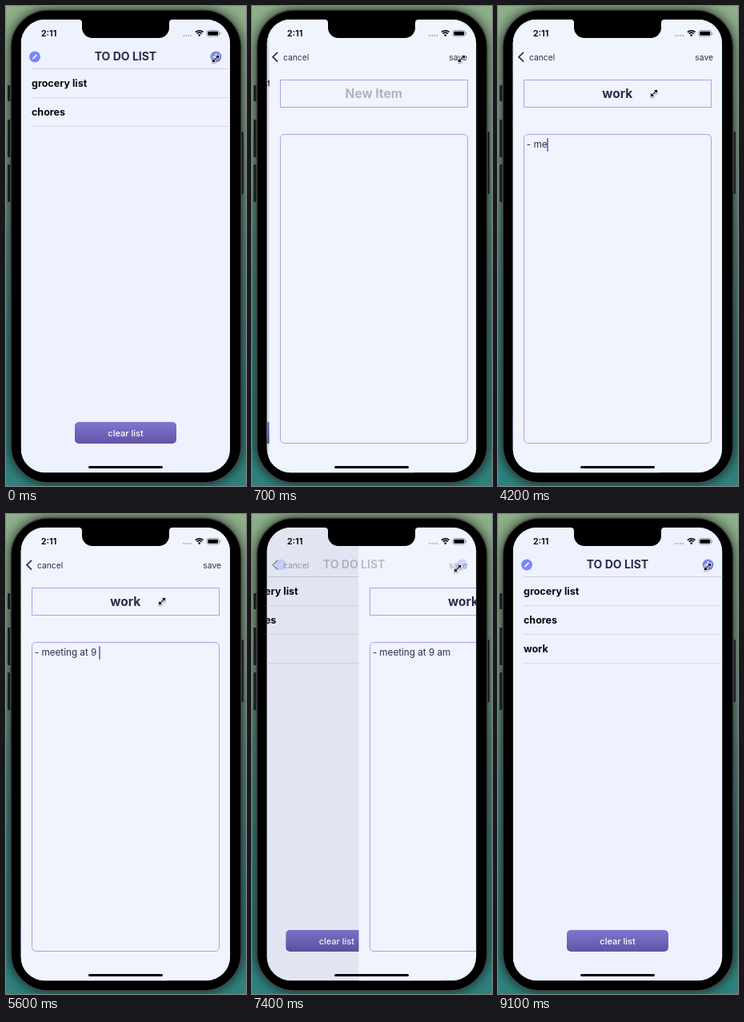
Write an HTML page with a canvas that moves like this. It is 300 px wide and 600 px high and loops after 9200 ms.

```html
<!DOCTYPE html>
<html lang="en">
<head>
<meta charset="utf-8">
<title>To do list</title>
<style>
  html, body { margin: 0; width: 100%; height: 100%; overflow: hidden; }
  canvas { display: block; width: 300px; height: 600px; }
</style>
</head>
<body>
<canvas id="stage"></canvas>
<script>
const LOOP = 9200, STEP = 100;
const PUSH = 340, POP = 7317, TAP_TITLE = 1500, TAP_NOTE = 3400, BLUR = 6700;
const INK = '#2c2c4e', VIOLET = '#a7a1ea', BLUE = '#7b87f6', CARET = '#5852b4';
const SCREEN = { x: 18.6, y: 16.8, w: 261.6, h: 566.6 };
const ROW = 36;

const canvas = document.getElementById('stage');
const ratio = window.devicePixelRatio || 1;
canvas.width = 300 * ratio;
canvas.height = 600 * ratio;
const ctx = canvas.getContext('2d');
ctx.scale(ratio, ratio);

const clamp = v => Math.min(1, Math.max(0, v));

function ease(t, from, to) {
  const u = clamp((t - from) / (to - from));
  return u * u * (3 - 2 * u);
}

// Critically damped spring from 0 to 1.
function spring(ms) {
  const a = 0.018 * Math.max(0, ms);
  return 1 - (1 + a) * Math.exp(-a);
}

function box(x, y, w, h, r, fill, stroke, lineWidth = 1) {
  ctx.beginPath();
  ctx.roundRect(x, y, w, h, r);
  if (fill) { ctx.fillStyle = fill; ctx.fill(); }
  if (stroke) { ctx.strokeStyle = stroke; ctx.lineWidth = lineWidth; ctx.stroke(); }
}

function disc(x, y, r, fill) {
  ctx.beginPath();
  ctx.arc(x, y, r, 0, Math.PI * 2);
  ctx.fillStyle = fill;
  ctx.fill();
}

function line(color, width, ...points) {
  ctx.beginPath();
  points.forEach(([x, y]) => ctx.lineTo(x, y));
  ctx.strokeStyle = color;
  ctx.lineWidth = width;
  ctx.stroke();
}

// Returns the width of the drawn text.
function label(text, x, y, size, weight, color, align = 'left') {
  ctx.font = `${weight} ${size}px Inter, "Open Sans", sans-serif`;
  ctx.textAlign = align;
  ctx.fillStyle = color;
  ctx.fillText(text, x, y);
  return ctx.measureText(text).width;
}

function vertical(y0, y1, ...colors) {
  const gradient = ctx.createLinearGradient(0, y0, 0, y1);
  colors.forEach((c, i) => gradient.addColorStop(i / (colors.length - 1), c));
  return gradient;
}

function layer(alpha, dx, draw) {
  ctx.save();
  ctx.globalAlpha *= alpha;
  ctx.translate(dx, 0);
  draw();
  ctx.restore();
}

// Each burst of typing has a start time and a pause per key.
const burst = (start, pause, text) =>
  [...text].map((key, i) => ({ key, at: start + i * pause }));
const titleKeys = burst(2400, 100, 'work');
const noteKeys = [
  ...burst(3500, 100, '- '), ...burst(4000, 150, 'mee'),
  ...burst(4500, 85, 'ting at 9'), ...burst(5600, 150, ' am')
];
const typed = (keys, t) => keys.filter(k => k.at <= t).map(k => k.key).join('');

// Solid after each key or tap, then blinking.
function caretAlpha(t) {
  if (t < TAP_TITLE || t > BLUR) return 0;
  const resets = [TAP_TITLE, TAP_NOTE, ...[...titleKeys, ...noteKeys].map(k => k.at)];
  const idle = t - Math.max(...resets.filter(at => at <= t));
  return clamp((700 - idle % 1000) / 150);
}

function drawPhone() {
  ctx.fillStyle = vertical(0, 600, '#8fb08b', '#7da183', '#558b80', '#38817d', '#2f827e');
  ctx.fillRect(0, 0, 300, 600);
  ctx.save();
  ctx.shadowColor = 'rgba(0,0,0,.8)';
  ctx.shadowBlur = 16 * ratio;
  box(6, 5, 288, 591, 47, '#000');
  ctx.restore();
  for (const [y, h] of [[99, 20], [142, 47], [198, 47]]) box(2, y, 4, h, 1, '#1d1e20');
  box(293.5, 157, 3.5, 78, 1, '#1d1e20');
  box(6, 5, 288, 591, 47, '#000', '#47494b', 1.4);
}

function drawPage(color) {
  ctx.fillStyle = color;
  ctx.fillRect(SCREEN.x, SCREEN.y, SCREEN.w, SCREEN.h);
}

function drawList(rows) {
  drawPage('#eef2ff');
  line('#cfd1dc', 1, [32, 78.5], [281, 78.5]);
  rows.forEach((text, i) => {
    label(text, 32, 101 + ROW * i, 12.5, 700, '#08080e');
    line('#d9dbe5', 1, [32, 114.5 + ROW * i], [281, 114.5 + ROW * i]);
  });
  box(86, 520, 127, 27, 5, vertical(520, 547, '#8176cf', '#7166bd', '#6052a6'));
  label('clear list', 149.5, 537.5, 11, 500, '#fff', 'center');
}

function drawForm(t) {
  drawPage('#eff4fd');
  box(32.5, 92.5, 234, 34, 0, null, VIOLET);
  box(32.5, 160.5, 234, 386, 5, null, VIOLET);

  const title = typed(titleKeys, t);
  const titleWidth = label(title || 'New Item', 149.2, 114.7, 15.5, 700, title ? INK : '#b0b3c0', 'center');
  const noteWidth = label(typed(noteKeys, t), 35.8, 177.2, 11.7, 400, INK);

  layer(caretAlpha(t), 0, () => {
    if (t >= TAP_NOTE) box(35.5 + noteWidth, 165, 1.5, 17, 0.7, CARET);
    else box(149 + titleWidth / 2 * (title ? 1 : -1), 98, 1.5, 23, 0.7, CARET);
  });
}

function drawListHeader(t, shift) {
  layer(1, shift / 2, () => label('TO DO LIST', 149.4, 67.6, 14, 700, INK, 'center'));
  disc(36, 63.5, 6.9, BLUE);
  line('#fff', 1.7, [33.5, 66], [38.4, 61.1]);
  layer(t > 0 && t < PUSH ? 0.45 : 1, 0, () => {
    disc(262.5, 63.5, 6.9, BLUE);
    line('#fff', 1.5, [258.5, 63.5], [266.5, 63.5]);
    line('#fff', 1.5, [262.5, 59.5], [262.5, 67.5]);
  });
}

function drawFormHeader(t) {
  line(INK, 1.7, [32, 57.8], [26, 63.7], [32, 69.6]);
  label('cancel', 39, 68, 10.3, 400, INK);
  layer(t > POP - 250 && t < POP ? 0.4 : 1, 0,
    () => label('save', 269, 68, 10.3, 400, INK, 'right'));
}

function drawStatus() {
  label('2:11', 43.7, 37.8, 11, 600, '#000');
  for (let i = 0; i < 4; i++) disc(222.3 + 3 * i, 37, 0.9, '#a5a8b3');
  ctx.strokeStyle = '#000';
  ctx.lineWidth = 1.6;
  for (const r of [7.2, 4.6]) {
    ctx.beginPath();
    ctx.arc(241.7, 38, r, -2.3, -0.84);
    ctx.stroke();
  }
  disc(241.7, 36.6, 1.3, '#000');
  box(251, 30.5, 15.5, 7.5, 2.2, null, '#8b8d96', 0.8);
  box(252.3, 31.8, 12.9, 4.9, 1.2, '#000');
  box(267.3, 33, 1, 2.6, 0.5, '#8b8d96');
  box(103, 575, 93, 3, 1.5, '#000');
}

function drawNotch() {
  box(95, 14, 109, 26, [0, 0, 13, 13], '#000');
  ctx.beginPath();
  for (const side of [-1, 1]) {
    const edge = 149.5 + 54.5 * side;
    ctx.moveTo(edge, 21);
    ctx.quadraticCurveTo(edge, 17, edge + 4 * side, 17);
    ctx.lineTo(edge, 16);
  }
  ctx.fill();
}

// Diagonal resize arrow.
function drawPointer(t) {
  const toTitle = ease(t, 1000, 1300), toStart = ease(t, 8300, 8700);
  const x = 262 - 67 * toTitle + 62 * ease(t, 6100, 6700) + 5 * toStart;
  const y = 66 + 43 * toTitle - 41 * ease(t, 6300, 7100) - 2 * toStart;
  ctx.save();
  ctx.translate(x, y);
  ctx.rotate(-Math.PI / 4);
  ctx.beginPath();
  for (const side of [-1, 1]) {
    ctx.moveTo(6 * side, 0);
    ctx.lineTo(2.6 * side, -2.6);
    ctx.lineTo(2.6 * side, 2.6);
    ctx.closePath();
  }
  ctx.rect(-3, -0.6, 6, 1.2);
  ctx.shadowColor = 'rgba(0,0,0,.4)';
  ctx.shadowBlur = 1.5 * ratio;
  ctx.shadowOffsetY = ratio;
  ctx.lineJoin = 'round';
  ctx.strokeStyle = '#fff';
  ctx.lineWidth = 1.5;
  ctx.stroke();
  ctx.shadowColor = 'transparent';
  ctx.fillStyle = '#000';
  ctx.fill();
  ctx.restore();
}

function draw(t) {
  const open = spring(t - PUSH) - spring(t - POP);
  const shift = -78 * open;
  const formX = 261 * (1 - open);
  const rows = ['grocery list', 'chores'];
  if (t >= POP) rows.push('work');

  drawPhone();
  ctx.save();
  ctx.beginPath();
  ctx.roundRect(SCREEN.x, SCREEN.y, SCREEN.w, SCREEN.h, 30);
  ctx.clip();
  layer(1, shift, () => drawList(rows));
  if (open > 0) {
    ctx.fillStyle = `rgba(0,0,0,${0.1 * open})`;
    ctx.fillRect(SCREEN.x, SCREEN.y, formX, SCREEN.h);
    layer(1, formX, () => drawForm(t));
  }
  layer(clamp(1 - open * 1.3), 0, () => drawListHeader(t, shift));
  layer(clamp(open * 1.3 - 0.3), 0, () => drawFormHeader(t));
  drawStatus();
  ctx.restore();
  drawNotch();
  drawPointer(t);
}

const start = performance.now();
function frame() {
  const elapsed = (performance.now() - start) % LOOP;
  draw(Math.floor(elapsed / STEP) * STEP);
  requestAnimationFrame(frame);
}
frame();
</script>
</body>
</html>
```
